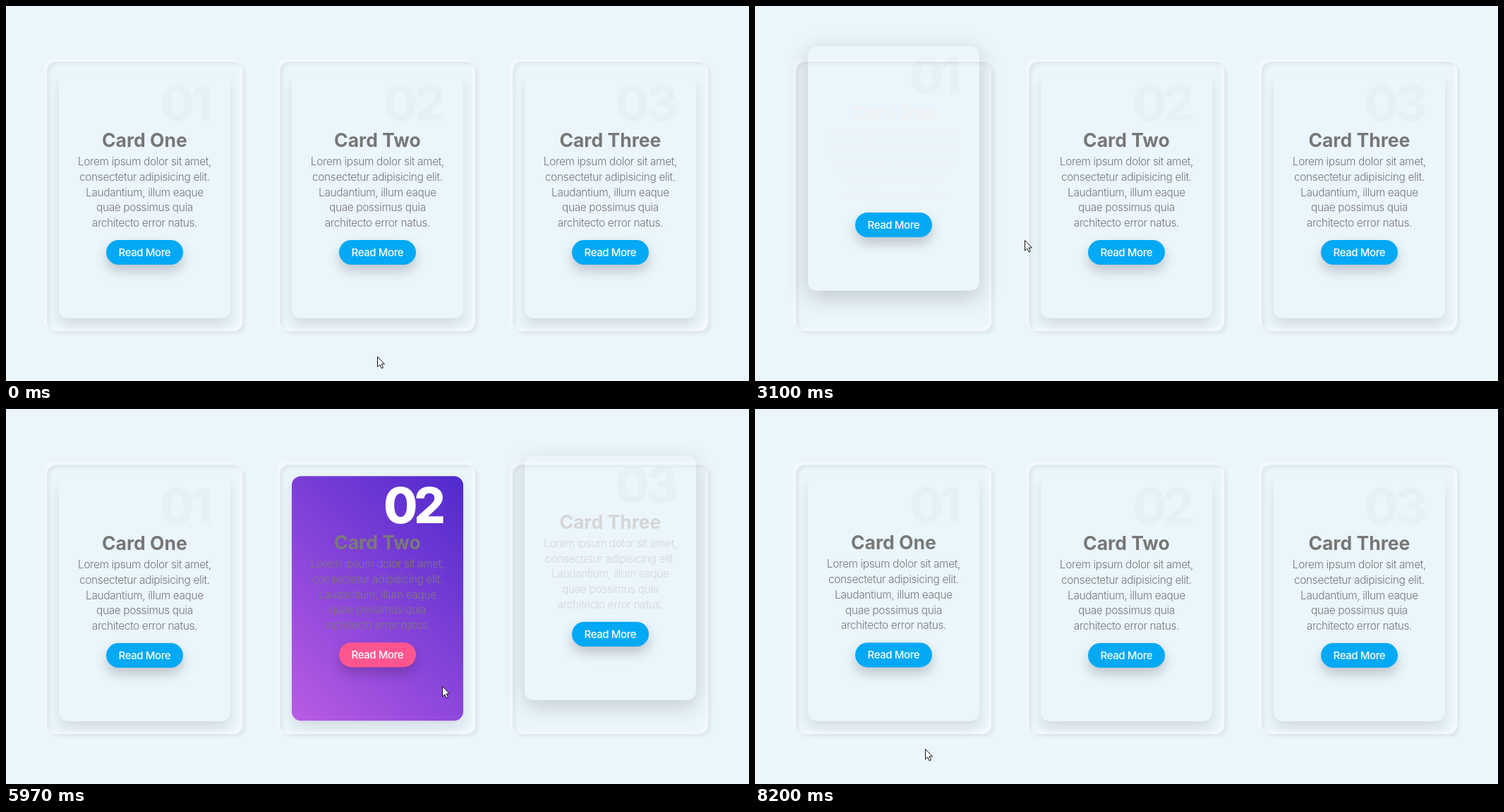
Recreate the animation shown at these times as an HTML page. Size 1053 px wide and 532 px high, loop 8280 ms.

```html
<!DOCTYPE html>
<html lang="en">
<head>
<meta charset="utf-8">
<title>Hover cards</title>
<style>
  html, body { margin: 0; width: 100%; height: 100%; overflow: hidden; background: #ebf5fc; }
  .card, .box, .button, svg { position: absolute; }
  .card {
    top: 79px; width: 277px; height: 382px; border-radius: 13px;
    box-shadow: inset 4.3px 4.3px 4.3px rgba(0,0,0,.05), inset -4.3px -4.3px 4.3px rgba(255,255,255,.5),
      4.3px 4.3px 4.3px rgba(0,0,0,.05), -4.3px -4.3px 4.3px rgba(255,255,255,.5);
  }
  .box { left: 17px; top: 17px; width: 243px; height: 347px; border-radius: 13px; }
  .button {
    left: 67px; top: 236px; width: 109px; height: 35px; border-radius: 17.5px;
    box-shadow: 0 8.7px 17.4px rgba(0,0,0,.2);
  }
  svg { left: 0; top: 0; overflow: visible; }
  .box svg { width: 243px; height: 347px; }
  text { font-family: Inter, sans-serif; text-anchor: middle; }
  .number { font-size: 70px; font-weight: 800; letter-spacing: -5px; text-anchor: end; }
  .title { font-size: 26.5px; font-weight: 700; }
  .body { font-size: 15.4px; font-weight: 350; letter-spacing: -.35px; }
  .label { font-size: 15px; font-weight: 500; letter-spacing: -.4px; fill: #fff; }
  #cursor { width: 20px; height: 20px; }
  #cursor path { fill: #fff; stroke: #111; stroke-width: 1; stroke-linejoin: round; }
</style>
</head>
<body>
<svg id="cursor">
  <path id="arrow" d="M.5.5V15L3.8 11.9 6.1 17 8.4 16 6.2 11H10.5Z"/>
  <path id="hand" d="M-2 10.5V2a1.5 1.5 0 0 1 3 0V7q3-1.5 3 .5q2.5-1 2.7.8q2-.5 2 1.2V13q0 2-1.2 5.5H0q-1-3-5-7.5q0-3 3-.5ZM1 7V10M4 7.5V10.3M6.5 8V10.5"/>
</svg>
<script>
const LOOP = 8280, STEP = LOOP / 107, FADE = 500, LIFT = 43;
const LINES = ["Lorem ipsum dolor sit amet,", "consectetur adipisicing elit.",
  "Laudantium, illum eaque", "quae possimus quia", "architecto error natus."];

// Hover spans are [enter, leave] in ms.
const cards = [
  { name: "One", hovers: [[1915, 3045], [6920, 7780]] },
  { name: "Two", hovers: [[650, 1837], [3110, 4270], [5942, 6850]] },
  { name: "Three", hovers: [[4340, 5857]] }
];

// Pointer moves; each starts where the last one ended and may sag downwards.
const home = { x: 526, y: 497 };
const moves = [
  { from: 0, to: 77, x: 533, y: 495 },
  { from: 590, to: 1160, x: 530, y: 312 },
  { from: 1605, to: 2399, x: 195, y: 312, sag: 28 },
  { from: 2795, to: 3640, x: 515, y: 322, sag: 15 },
  { from: 4101, to: 4640, x: 840, y: 316, sag: 11 },
  { from: 5040, to: 5417, x: 848, y: 334 },
  { from: 5660, to: 6430, x: 480, y: 314, sag: 76 },
  { from: 6733, to: 7430, x: 200, y: 312 },
  { from: 7510, to: 7930, x: 241, y: 482 }
];

const byId = id => document.getElementById(id);
const cursor = byId("cursor"), arrow = byId("arrow"), hand = byId("hand");
const mix = (a, b, k) => a + (b - a) * k;

// The CSS "ease" curve, cubic-bezier(.25, .1, .25, 1).
function ease(x) {
  if (x <= 0) return 0;
  if (x >= 1) return 1;
  const bezier = (a, b, u) => 3 * a * u * (1 - u) ** 2 + 3 * b * u * u * (1 - u) + u ** 3;
  let low = 0, high = 1;
  for (let i = 0; i < 24; i++) {
    const mid = (low + high) / 2;
    if (bezier(.25, .25, mid) < x) low = mid; else high = mid;
  }
  return bezier(.1, 1, low);
}

function build(card, index) {
  const el = document.createElement("div");
  el.className = "card";
  card.x = 58 + 330 * index;
  el.style.left = card.x + "px";
  const line = (text, i) => `<text class="body" x="121.4" y="${130 + i * 21.75}">${text}</text>`;
  el.innerHTML = `<div class="box"><div class="button"></div><svg>
    <text class="number" x="213" y="67">0${index + 1}</text>
    <g class="copy"><text class="title" x="121.4" y="104">Card ${card.name}</text>${LINES.map(line).join("")}</g>
    <text class="label" x="121.4" y="258.6">Read More</text></svg></div>`;
  document.body.insertBefore(el, cursor);
  for (const part of ["box", "button", "number", "copy"]) card[part] = el.querySelector("." + part);
}

function hoverState(card, t) {
  const span = card.hovers.filter(([enter]) => enter <= t).pop();
  if (!span) return { on: false, amount: 0 };
  const [enter, leave] = span;
  return t < leave
    ? { on: true, amount: ease((t - enter) / FADE) }
    : { on: false, amount: 1 - ease((t - leave) / FADE) };
}

function drawCard(card, t) {
  const { on, amount } = hoverState(card, t);
  const grey = Math.round(mix(119, 255, amount));
  card.shift = -LIFT * amount;
  card.box.style.transform = `translateY(${card.shift}px)`;
  card.box.style.background = on
    ? "linear-gradient(45deg, #b95ce4, #4f29cd)"
    : `rgba(235,245,252,${1 - amount})`;
  card.box.style.boxShadow =
    `0 8.7px ${mix(17.4, 34.7, amount)}px rgba(0,0,0,${mix(.1, .2, amount)})`;
  card.button.style.background = on ? "#ff568f" : "#03a9f4";
  card.number.style.fill = on ? "#fff" : "rgba(0,0,0,.02)";
  card.copy.style.fill = `rgb(${grey},${grey},${grey})`;
}

function pointerAt(t) {
  let { x, y } = home;
  for (const move of moves) {
    if (t < move.from) break;
    const k = 1 - (1 - Math.min(1, (t - move.from) / (move.to - move.from))) ** 2;
    x = mix(x, move.x, k);
    y = mix(y, move.y, k) + (move.sag || 0) * 4 * k * (1 - k);
  }
  return { x: Math.round(x), y: Math.round(y) };
}

function drawCursor(t) {
  const { x, y } = pointerAt(t);
  const onButton = cards.some(card => {
    const dx = x - card.x - 84, dy = y - 332 - card.shift;
    return dx > 0 && dx < 109 && dy > 0 && dy < 35;
  });
  cursor.style.transform = `translate(${x}px, ${y}px)`;
  arrow.style.display = onButton ? "none" : "";
  hand.style.display = onButton ? "" : "none";
}

// The motion advances in even steps, like a screen capture.
function frame() {
  const now = (performance.now() - start) % LOOP;
  const t = Math.min(106, Math.floor((now + 12) / STEP)) * STEP;
  cards.forEach(card => drawCard(card, t));
  drawCursor(t);
  requestAnimationFrame(frame);
}

cards.forEach(build);
const start = performance.now();
frame();
</script>
</body>
</html>
```
